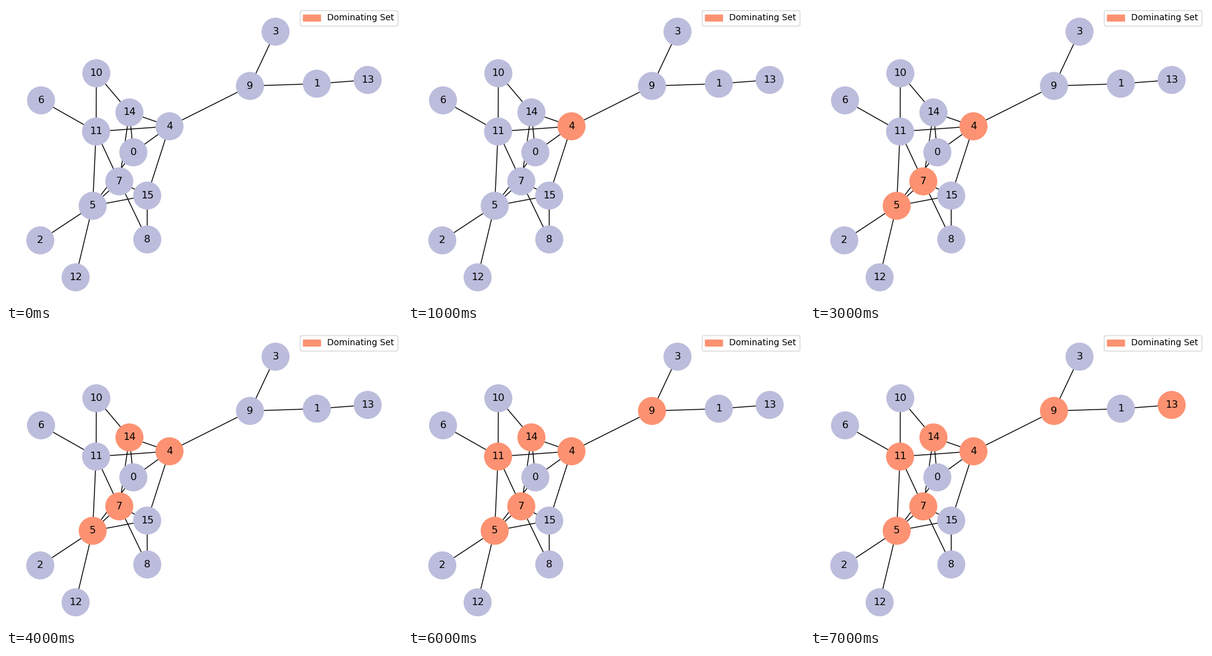
These frames come from a looping animation (640x480 px, 8 s). A matplotlib script:

```python
from itertools import pairwise

import matplotlib.pyplot as plt
from matplotlib.animation import FuncAnimation
from matplotlib.collections import LineCollection
from matplotlib.colors import to_rgba
from matplotlib.patches import Patch

W, H, DPI = 640, 480, 100
STEP_MS = 1000
PLAIN, CHOSEN = to_rgba("#bcbddc"), to_rgba("#fc9272")

# Node centres in pixels; a node's label is its index
CENTRES = [
    (205.8, 236.5), (502.3, 125.6), (55.4, 378.8), (435.6, 41.5),
    (264.2, 194.4), (140.1, 322.9), (56.6, 152.5), (183.1, 283.4),
    (228.3, 377.3), (394.3, 129.2), (146.0, 108.7), (145.6, 202.9),
    (112.5, 438.5), (584.5, 119.5), (199.5, 172.0), (228.2, 306.4),
]
# Each walk links its successive nodes
WALKS = [
    (13, 1, 9, 4, 14, 10, 11, 6),
    (0, 14, 7, 15, 4, 0, 5, 7, 8, 15, 5, 11, 4),
    (2, 5, 12), (3, 9), (7, 11),
]
JOINING = (4, 5, 7, 14, 9, 11, 13)  # one node joins the set per step


def make_axes():
    fig = plt.figure(figsize=(W / DPI, H / DPI), dpi=DPI, facecolor="white")
    ax = fig.add_axes([0, 0, 1, 1])
    ax.set_xlim(0, W)
    ax.set_ylim(H, 0)
    ax.axis("off")
    return fig, ax


def draw_edges(ax):
    edges = [(CENTRES[a], CENTRES[b]) for walk in WALKS for a, b in pairwise(walk)]
    ax.add_collection(LineCollection(edges, colors="black", linewidths=1, zorder=1))


def draw_nodes(ax):
    nodes = ax.scatter(*zip(*CENTRES), s=1000, color=PLAIN, linewidths=1, zorder=2)
    for label, (x, y) in enumerate(CENTRES):
        ax.text(x, y, str(label), size=11.75, ha="center", va="center", zorder=3)
    return nodes


def draw_legend(ax):
    key = Patch(color=CHOSEN, label="Dominating Set")
    ax.legend(handles=[key], loc="upper right", fontsize=10)


def update(step):
    members = set(JOINING[:step])
    nodes.set_color([CHOSEN if n in members else PLAIN
                     for n in range(len(CENTRES))])
    return [nodes]


plt.rcParams["font.family"] = "DejaVu Sans"
fig, ax = make_axes()
draw_edges(ax)
nodes = draw_nodes(ax)
draw_legend(ax)

anim = FuncAnimation(fig, update, frames=len(JOINING) + 1, interval=STEP_MS,
                     repeat=True, repeat_delay=0, blit=False)
plt.show()
```
